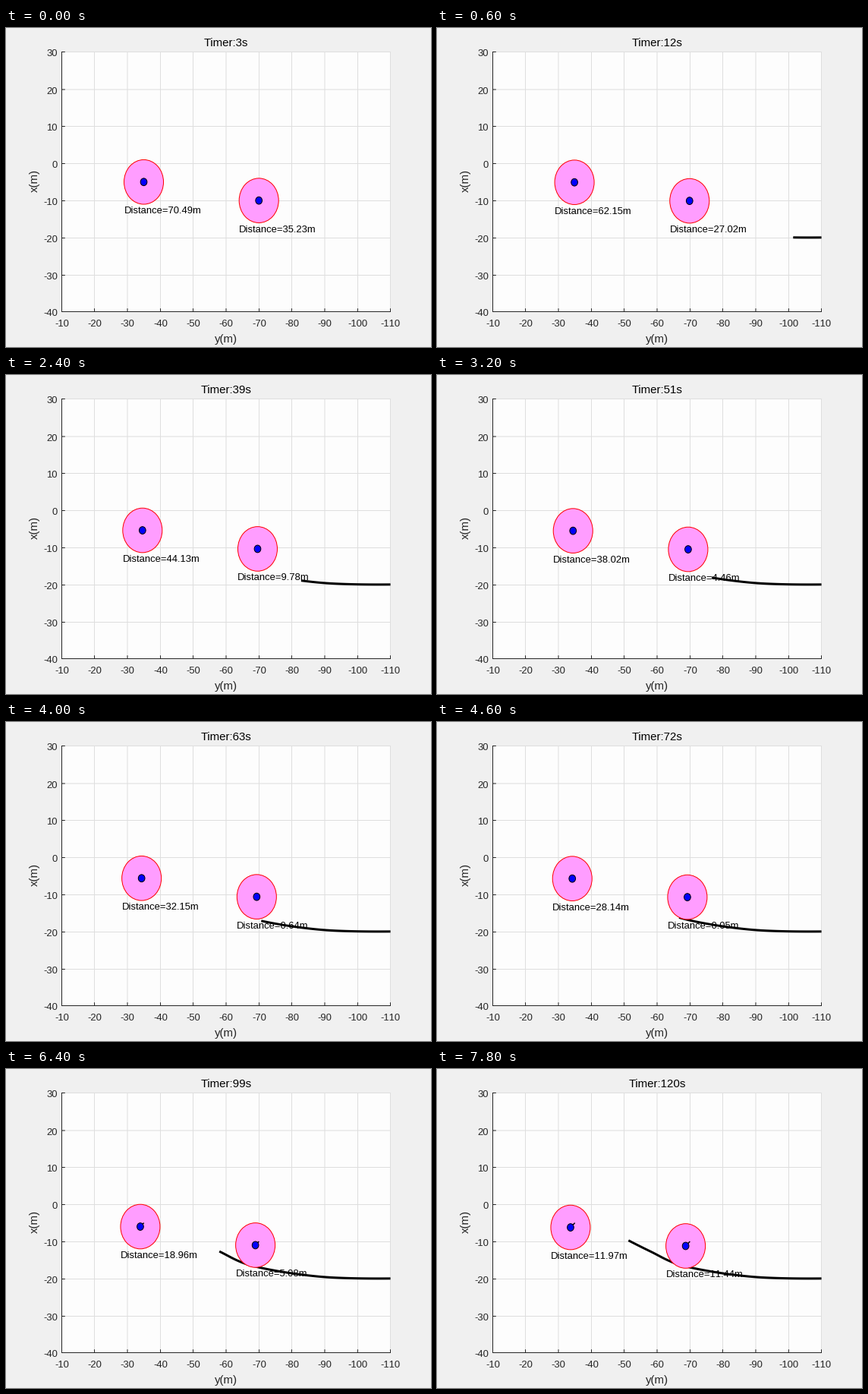
A matplotlib script for the animation above (8000 ms loop, 560x420 px).

```python
import numpy as np
import matplotlib.pyplot as plt
from matplotlib.animation import FuncAnimation
from matplotlib.patches import Ellipse, Rectangle

W, H, DPI = 560, 420, 100
PT = 72 / DPI                       # points per pixel
LEFT, RIGHT, TOP, BOTTOM = 73.33, 506.67, 31.67, 373.5
SX, SY = (RIGHT - LEFT) / 100, (BOTTOM - TOP) / 70
INK = "#262626"
FRAMES, STEP = 40, 3                # each frame advances the timer by 3 s
RADIUS = 6

plt.rcParams["font.family"] = "Liberation Sans"
plt.rcParams["text.kerning_factor"] = 6     # practically no kerning

# Ship waypoints: time, y, x
WAY = np.array([
    (3, -109.975, -20.0), (24, -91.791, -19.709), (39, -82.836, -18.945),
    (51, -76.614, -18.132), (72, -66.692, -16.237), (99, -57.960, -12.693),
    (120, -51.304, -9.735),
])
TIMES, SPOTS = WAY[:, 0], WAY[:, 1:]
SLOPES = np.gradient(SPOTS, TIMES, axis=0, edge_order=2)

STARTS = np.array([(-35.0, -5.0), (-70.0, -10.0)])
DRIFT = np.array([0.011, -0.0102])


def px(y):
    return LEFT + (-10 - y) * SX


def py(x):
    return TOP + (30 - x) * SY


def ship(t):
    """Ship position at times t by cubic Hermite interpolation."""
    t = np.atleast_1d(t).astype(float)
    i = np.clip(np.searchsorted(TIMES, t, side="right") - 1, 0, len(TIMES) - 2)
    h = (TIMES[i + 1] - TIMES[i])[:, None]
    s = (t - TIMES[i])[:, None] / h
    return ((1 + 2 * s) * (1 - s) ** 2 * SPOTS[i]
            + s * (1 - s) ** 2 * h * SLOPES[i]
            + s * s * (3 - 2 * s) * SPOTS[i + 1]
            + s * s * (s - 1) * h * SLOPES[i + 1])


fig = plt.figure(figsize=(W / DPI, H / DPI), dpi=DPI, facecolor="#f0f0f0")
ax = fig.add_axes([0, 0, 1, 1])
ax.set_xlim(0, W)
ax.set_ylim(H, 0)
ax.axis("off")


def line(xs, ys, color, width=1, z=1, **kw):
    return ax.plot(xs, ys, color=color, lw=width * PT, zorder=z, **kw)[0]


def label(x, y, text, size=13, color=INK, ha="center", **kw):
    return ax.text(x, y, text, fontsize=size * PT, color=color, ha=ha,
                   va="baseline", zorder=9, **kw)


def disc(r, face, edge, z):
    patch = Ellipse((0, 0), 2 * r * SX, 2 * r * SY, fc=face, ec=edge,
                    lw=PT, zorder=z)
    return ax.add_patch(patch)


def snap(v):
    """Centre a line on a pixel, or across two when it lies halfway."""
    near = np.round(v)
    return (near if abs(v - near) < 0.4 else np.floor(v) + 0.5) + 0.5


# Plot area, grid, ticks and labels
x0, x1, y0, y1 = 73.5, 506.5, 31.5, 373.5
area = ax.add_patch(Rectangle((x0, y0), x1 - x0, y1 - y0,
                              fc="#fdfdfd", ec="none", zorder=0))
for v in range(-10, -111, -10):
    x = snap(px(v) - 0.5)
    line([x, x], [y0, y1], "#dedede", snap=False)
    line([x, x], [y1, y1 - 3.8], INK, z=2, snap=False)
    label(x, 393, str(v))
for v in range(-40, 31, 10):
    y = np.clip(snap(py(v)), y0, y1) if v > -40 else y1
    y = y0 if v == 30 else y
    line([x0, x1], [y, y], "#dedede", snap=False)
    line([x0, x0 + 3.8], [y, y], INK, z=2, snap=False)
    label(68, np.round(y + 5.6), str(v), ha="right")
line([x0, x0], [y0, y1], INK, z=2, snap=False)
line([x0, x1], [y1, y1], INK, z=2, snap=False)
label(290, 414, "y(m)", 15)
label(42, 200.5, "x(m)", 15, rotation=90, rotation_mode="anchor")

# Moving parts
title = label(290, 24, "", 15, "black")
wake = line([], [], "black", 3, 3, solid_capstyle="butt")
wake.set_clip_path(area)
zones = [disc(RADIUS, "#ff9dff", "red", 4) for _ in STARTS]
trails = [line([], [], "black", 1.5, 5, solid_capstyle="butt") for _ in STARTS]
dots = [disc(1, "blue", "black", 6) for _ in STARTS]
notes = [label(0, 0, "", color="black", ha="left") for _ in STARTS]


def draw(k):
    t = STEP * (k + 1)
    title.set_text(f"Timer:{t}s")

    path = ship(np.arange(STEP, t + 1))
    wake.set_data(px(path[:, 0]), py(path[:, 1]))

    for start, zone, trail, dot, note in zip(STARTS, zones, trails, dots, notes):
        pos = start + DRIFT * t
        cx, cy = px(pos[0]), py(pos[1])
        zone.center = dot.center = (cx, cy)
        trail.set_data([px(start[0]), cx], [py(start[1]), cy])
        gap = abs(np.hypot(*(path[-1] - pos)) - RADIUS)
        note.set_text(f"Distance={round(gap, 2):g}m")
        note.set_position((np.round(cx - RADIUS * SX), np.floor(cy + 42)))
    return [title, wake, *zones, *trails, *dots, *notes]


anim = FuncAnimation(fig, draw, frames=FRAMES, interval=200,
                     init_func=lambda: draw(0), repeat=True, repeat_delay=0)
plt.show()
```
